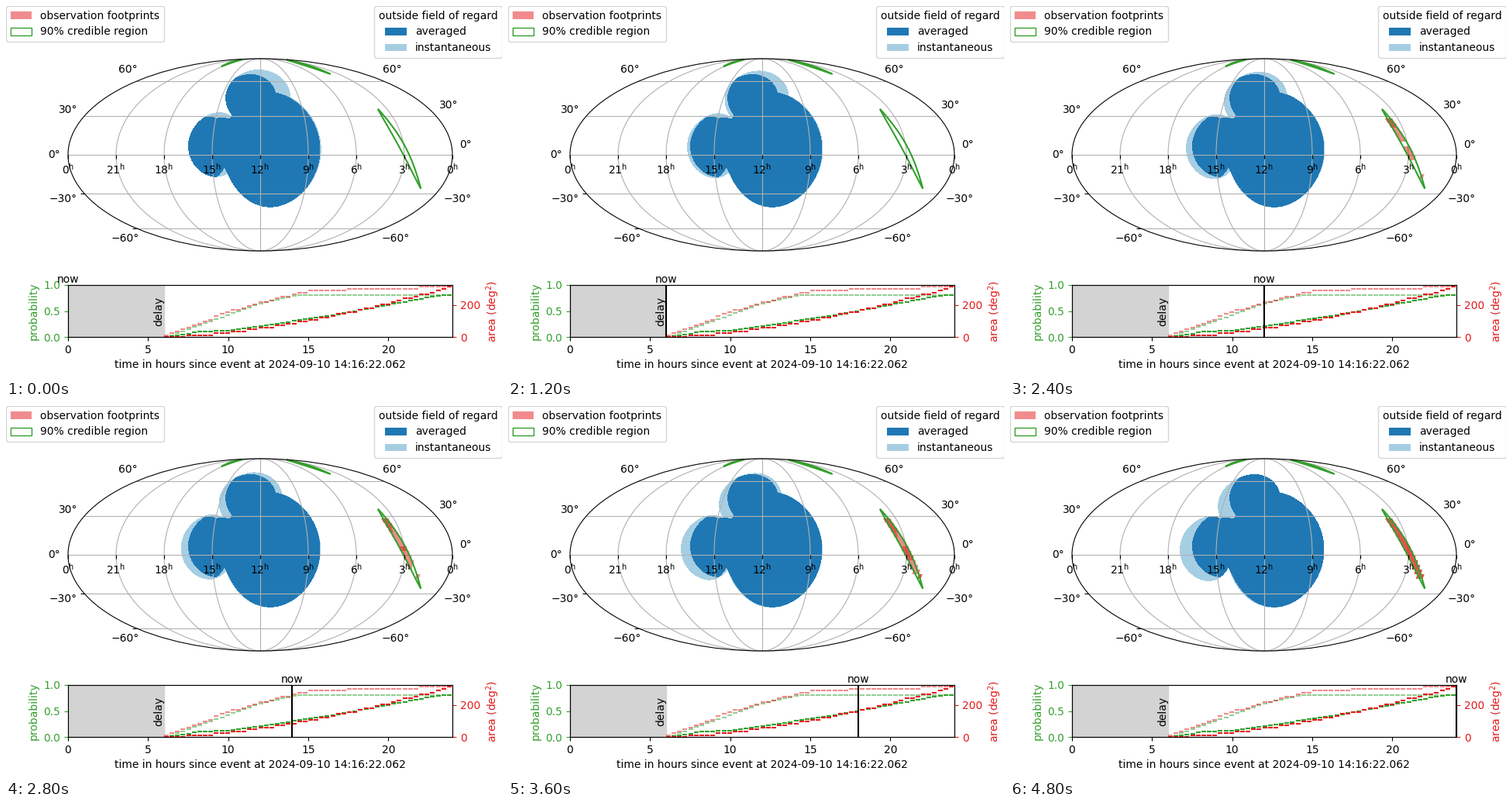
A matplotlib script that plays this animation: 640 by 480 pixels, repeating every 5 s.

```python
import numpy as np
import matplotlib.pyplot as plt
from matplotlib.animation import FuncAnimation
from matplotlib.colors import ListedColormap
from matplotlib.markers import TICKDOWN, TICKLEFT
from matplotlib.patches import Ellipse, Patch, Polygon

LIGHT_BLUE, BLUE, GREEN, RED = "#a6cee3", "#1f78b4", "#33a02c", "#e31a1c"
WIDTH, HEIGHT = 640, 480
CX, CY, RX, RY = 328, 192, 248, 124
HOURS, DELAY, FIELDS, FIELD_AREA = 24, 6, 26, 12


def mollweide(ra, dec):
    """Sky position in degrees to stage pixels, centred on 12h."""
    ra, dec = np.broadcast_arrays(np.asarray(ra, float), np.radians(dec))
    theta = dec * 0.8
    for _ in range(12):
        slope = np.maximum(2 + 2 * np.cos(2 * theta), 1e-6)
        theta = theta - (2 * theta + np.sin(2 * theta) - np.pi * np.sin(dec)) / slope
    x = CX + RX * (180 - ra) / 180 * np.cos(theta)
    return np.column_stack([x, CY - RY * np.sin(theta)])


def unit_vector(ra, dec):
    ra, dec = np.radians(ra), np.radians(dec)
    return np.array([np.cos(dec) * np.cos(ra), np.cos(dec) * np.sin(ra), np.sin(dec)])


def stage_vectors():
    """Sky direction of every stage pixel, NaN off the map."""
    x, y = np.meshgrid(np.arange(WIDTH) + 0.5, np.arange(HEIGHT) + 0.5)
    u, v = (x - CX) / RX, (CY - y) / RY
    inside = u * u + v * v < 1
    theta = np.arcsin(np.where(inside, v, 0))
    dec = np.degrees(np.arcsin((2 * theta + np.sin(2 * theta)) / np.pi))
    ra = 180 - 180 * u / np.cos(theta)
    return np.where(inside, unit_vector(ra, dec), np.nan)


# Avoidance zones drifting evenly: (ra, dec) at start, at end, radius
bodies = [((168.9, 4.8), (169.8, 4.4), 46),
          ((182.7, 46.8), (196.6, 41.5), 26),
          ((222.6, 8.0), (234.1, 4.9), 25)]
pixels = stage_vectors()


def blocked(hour):
    mask = np.zeros((HEIGHT, WIDTH), bool)
    for start, end, radius in bodies:
        ra, dec = np.array(start) + np.subtract(end, start) * hour / HOURS
        mask |= np.tensordot(unit_vector(ra, dec), pixels, 1) > np.cos(np.radians(radius))
    return mask


blocked_at = [blocked(hour) for hour in range(HOURS + 1)]
always_blocked = np.all(blocked_at, axis=0)


def regard(hour):
    level = blocked_at[hour].astype(int) + always_blocked
    return np.ma.masked_equal(level, 0)


# Coverage histories
def area_once(hour):
    return np.interp(hour, [6, 10, 14.5, 16, 24], [0, 155, 276, 290, 312])


def area_twice(hour):
    return 312 * np.clip((hour - DELAY) / (HOURS - DELAY), 0, 1) ** 1.6


def prob_once(hour):
    return np.interp(hour, [6, 12, 14.2], [0, 0.66, 0.806])


def prob_twice(hour):
    return np.interp(hour, [6, 8, 10, 16, 23, 24], [0, 0.10, 0.13, 0.40, 0.80, 0.82])


def field_count(area, hour):
    return np.rint(area(hour) / FIELD_AREA).astype(int)


fig = plt.figure(figsize=(WIDTH / 100, HEIGHT / 100), dpi=100)
sky = fig.add_axes([0, 0, 1, 1])
zones = sky.imshow(regard(0), cmap=ListedColormap([LIGHT_BLUE, BLUE]), vmin=1, vmax=2,
                   extent=(0, WIDTH, HEIGHT, 0), aspect="auto",
                   interpolation="nearest", zorder=1)
sky.set(xlim=(0, WIDTH), ylim=(HEIGHT, 0))
sky.axis("off")

# Graticule
lat = np.linspace(-90, 90, 181)
grid = dict(color="#b0b0b0", lw=0.8, zorder=2)
for ra in range(45, 360, 45):
    sky.plot(*mollweide(ra, lat).T, **grid)
for dec in range(-60, 90, 30):
    sky.plot(*mollweide([0, 360], dec).T, **grid)
sky.add_patch(Ellipse((CX, CY), 2 * RX, 2 * RY, fc="none", ec="black", lw=0.8, zorder=4))

tick = dict(color="black", ls="none", ms=3.5, mew=0.8, zorder=4)
for hour in range(0, 25, 3):
    x = CX + RX * (12 - hour) / 12
    sky.plot(x, CY, marker=TICKDOWN, **tick)
    sky.text(x, 216.5, rf"{hour % 24}$^\mathrm{{h}}$", ha="center", zorder=5)
sky.plot(*mollweide(360, [-30, -60]).T, marker=TICKLEFT, **tick)


def label_latitude(dec, ra, nudge=(0, 0), pad=9.7):
    """Push a label off the map edge along the outward normal."""
    x, y = mollweide(ra, dec)[0]
    text = sky.text(0, 0, f"{dec}°".replace("-", "\u2212"), ha="center", va="center",
                    zorder=5)
    box = text.get_window_extent()
    normal = np.array([(x - CX) / RX**2, (y - CY) / RY**2])
    normal /= np.hypot(*normal)
    reach = normal.copy()
    steep = int(abs(normal[1]) > abs(normal[0]))
    reach[steep] = np.sign(normal[steep])
    shift = reach * [box.width / 2, box.height / 2]
    shift *= 1 + pad / np.hypot(*shift)
    text.set_position((x + shift[0] + nudge[0], y + shift[1] + nudge[1]))


for dec in range(-60, 90, 30):
    label_latitude(dec, 360)
    label_latitude(dec, 0, {0: (-1, -13), 30: (-5, -6)}.get(dec, (0, 0)))


def lens(start, end, bow, half):
    """Bowed sliver between two points."""
    start, end = np.array(start), np.array(end)
    dx, dy = end - start
    normal = np.array([dy, -dx]) / np.hypot(dx, dy)
    s = np.linspace(0, 1, 40)[:, None]
    bulge = np.sin(np.pi * s)
    middle = start + (end - start) * s + normal * bow * bulge
    side = normal * half * bulge ** 0.8
    return np.vstack([middle + side, (middle - side)[::-1]])


# Credible region
for shape in (((480, 133), (535, 235), 4.4, 3.5),
              ((278, 78), (304, 69), 0.8, 0.6),
              ((362, 69.5), (418, 87.5), 1.2, 0.9)):
    sky.add_patch(Polygon(lens(*shape), fc="none", ec=GREEN, lw=1.5, zorder=3.5))


def footprint(index):
    row, column = divmod(index, 2)
    y = 148 + 6 * row
    s = (y - 133) / 102
    x = 480 + 55 * s + 5 * np.sin(np.pi * s) + 4.4 * (column - 0.5)
    u = (CY - y) / RY
    shear = 1.5 * u / np.sqrt(1 - u * u)
    corners = [(-2.3, -3), (2.3, -3), (2.3, 3), (-2.3, 3)]
    return [(x + dx + shear * dy, y + dy) for dx, dy in corners]


visit_order = [*range(5), *range(12, 18), 25, *range(5, 12), *range(18, 25)]
visits = [[sky.add_patch(Polygon(footprint(i), fc=RED, alpha=0.5, lw=0, zorder=3))
           for i in visit_order] for _ in range(2)]

# Timeline
prob = fig.add_subplot(fig.add_gridspec(2, 1, height_ratios=[4, 1])[1])
area = prob.twinx()
prob.axvspan(0, DELAY, color="lightgray")
prob.text(DELAY, 0.5, "delay", rotation=90, ha="right", va="center")
starts = np.linspace(DELAY, HOURS, 2 * FIELDS, endpoint=False)
ends = starts + 0.29
for history, alpha in ((prob_once, 0.5), (prob_twice, 1)):
    prob.hlines(history(starts), starts, ends, color=GREEN, alpha=alpha)
for history, alpha in ((area_once, 0.5), (area_twice, 1)):
    area.hlines(field_count(history, starts + 0.17) * FIELD_AREA, starts, ends,
                color=RED, alpha=alpha)
prob.set(xlim=(0, HOURS), ylim=(0, 1), yticks=[0, 0.5, 1],
         xlabel="time in hours since event at 2024-09-10 14:16:22.062")
area.set(ylim=(0, 324), yticks=[0, 200])
prob.set_ylabel("probability", color=GREEN)
area.set_ylabel("area (deg$^2$)", color=RED)
prob.tick_params(axis="y", colors=GREEN)
area.tick_params(axis="y", colors=RED)
now_line = area.axvline(0, color="black", lw=1.5)
now_text = area.text(0, 1.045, "now", ha="center", transform=area.get_xaxis_transform())

fig.legend(handles=[Patch(fc=RED, alpha=0.5, lw=0, label="observation footprints"),
                    Patch(fc="none", ec=GREEN, label="90% credible region")],
           loc="upper left", borderaxespad=0)
fig.legend(handles=[Patch(fc=BLUE, lw=0, label="averaged"),
                    Patch(fc=LIGHT_BLUE, lw=0, label="instantaneous")],
           title="outside field of regard", loc="upper right", borderaxespad=0)


def update(hour):
    zones.set_data(regard(hour))
    for patches, history in zip(visits, (area_once, area_twice)):
        done = field_count(history, hour)
        for i, patch in enumerate(patches):
            patch.set_visible(i < done)
    now_line.set_xdata([hour, hour])
    now_text.set_x(hour)
    return [zones, now_line, now_text]


anim = FuncAnimation(fig, update, frames=HOURS + 1, interval=200, repeat=True,
                     repeat_delay=0)
plt.show()
```
